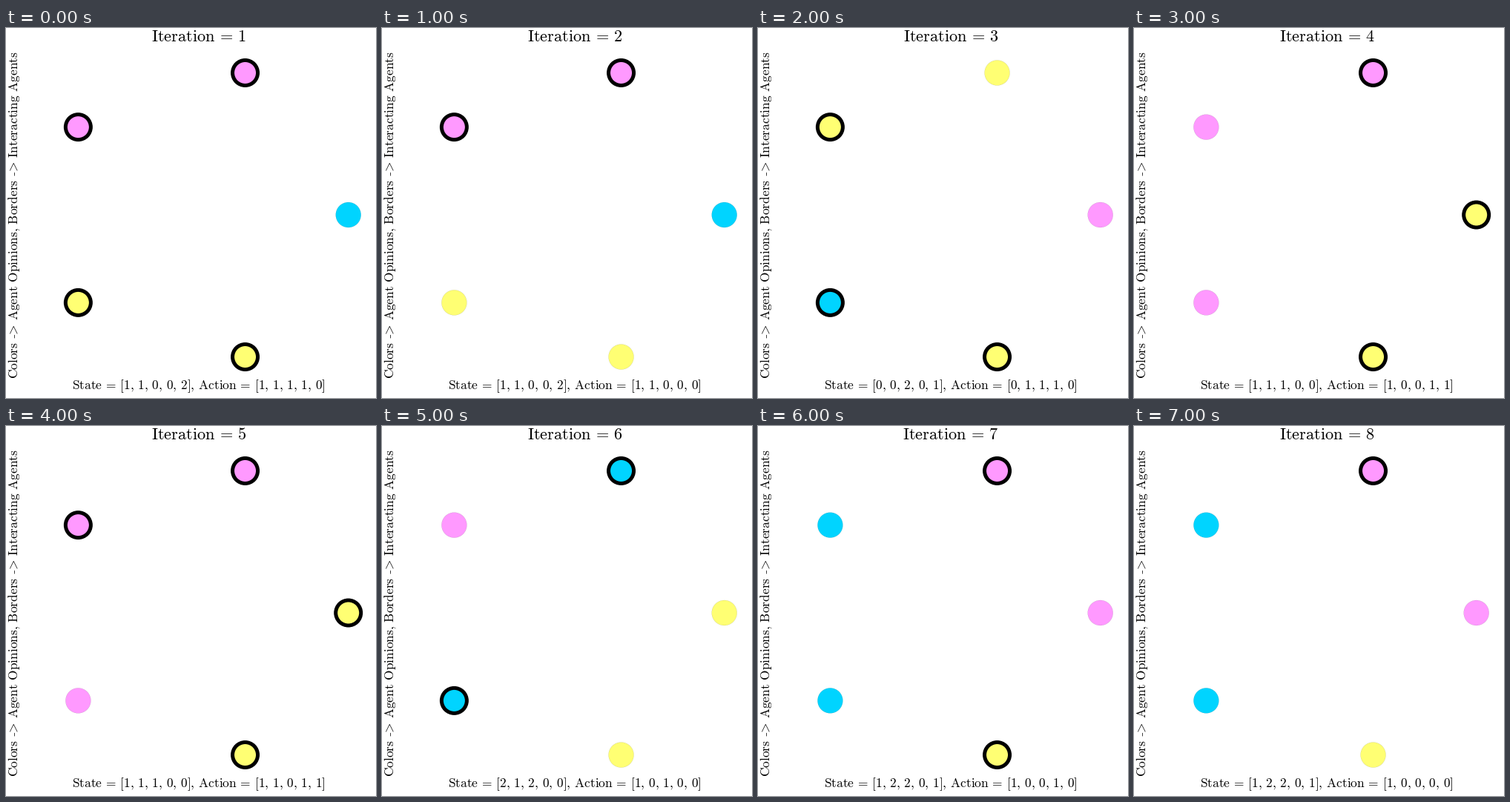
A matplotlib script for the animation above (8000 ms loop, 499 px wide and 499 px high).

```python
import numpy as np
import matplotlib.pyplot as plt
from matplotlib.animation import FuncAnimation

SIZE = 499
DPI = 128
PX = 72 / DPI  # one pixel in points
CENTER = (260.3, 252.0)
RADIUS = 201.4
COLORS = ["#ffff73", "#ff99ff", "#00d4ff"]

# one digit per agent: its opinion, and whether it interacts
OPINIONS = "11002 00201 11100 21200 12201".split()
INTERACTING = "11110 11000 01110 10011 11011 10100 10010 10000".split()

plt.rcParams["mathtext.fontset"] = "cm"
plt.rcParams["font.family"] = "Liberation Serif"


def roman(text):
    """Set text in upright Computer Modern with normal word spaces."""
    words = [r"\text{%s}" % word for word in text.split()]
    body = r"\hspace{0.38}".join(words)
    # a leading dash leaves math mode so that it stays a hyphen
    return "$" + body.replace(r"\text{-", r"$-$\text{") + "$"


def label(x, y, size, text="", rotation=0):
    return ax.text(x, y, text, fontsize=size * PX, color="black",
                   ha="center", va="baseline",
                   rotation=rotation, rotation_mode="anchor")


def step(i):
    """Opinions and actions at step i; every third change is skipped."""
    held = (i + 2) // 3
    opinions = OPINIONS[i - held]
    return [int(c) for c in opinions], [int(c) for c in INTERACTING[i]]


fig = plt.figure(figsize=(SIZE / DPI, SIZE / DPI), dpi=DPI, facecolor="white")
ax = fig.add_axes([0, 0, 1, 1])
ax.set_xlim(0, SIZE)
ax.set_ylim(SIZE, 0)
ax.axis("off")

title = label(260.25, 17.6, 22.3)
caption = label(260.25, 487.6, 17.37)
label(16.8, 251.8, 17.37,
      roman("Colors -> Agent Opinions, Borders -> Interacting Agents"), 90)

angles = np.radians(72 * np.arange(1, 6))
agents = ax.scatter(CENTER[0] + RADIUS * np.cos(angles),
                    CENTER[1] - RADIUS * np.sin(angles),
                    s=(34 * PX) ** 2, edgecolors="black")


def update(i):
    state, action = step(i)
    agents.set_facecolor([COLORS[s] for s in state])
    agents.set_linewidth([(5 if a else 0.07) * PX for a in action])
    title.set_text(roman(f"Iteration = {i + 1}"))
    caption.set_text(roman(f"State = {state}, Action = {action}"))
    return agents, title, caption


anim = FuncAnimation(fig, update, frames=len(INTERACTING), interval=1000,
                     init_func=lambda: update(0), repeat=True, repeat_delay=0)
plt.show()
```
